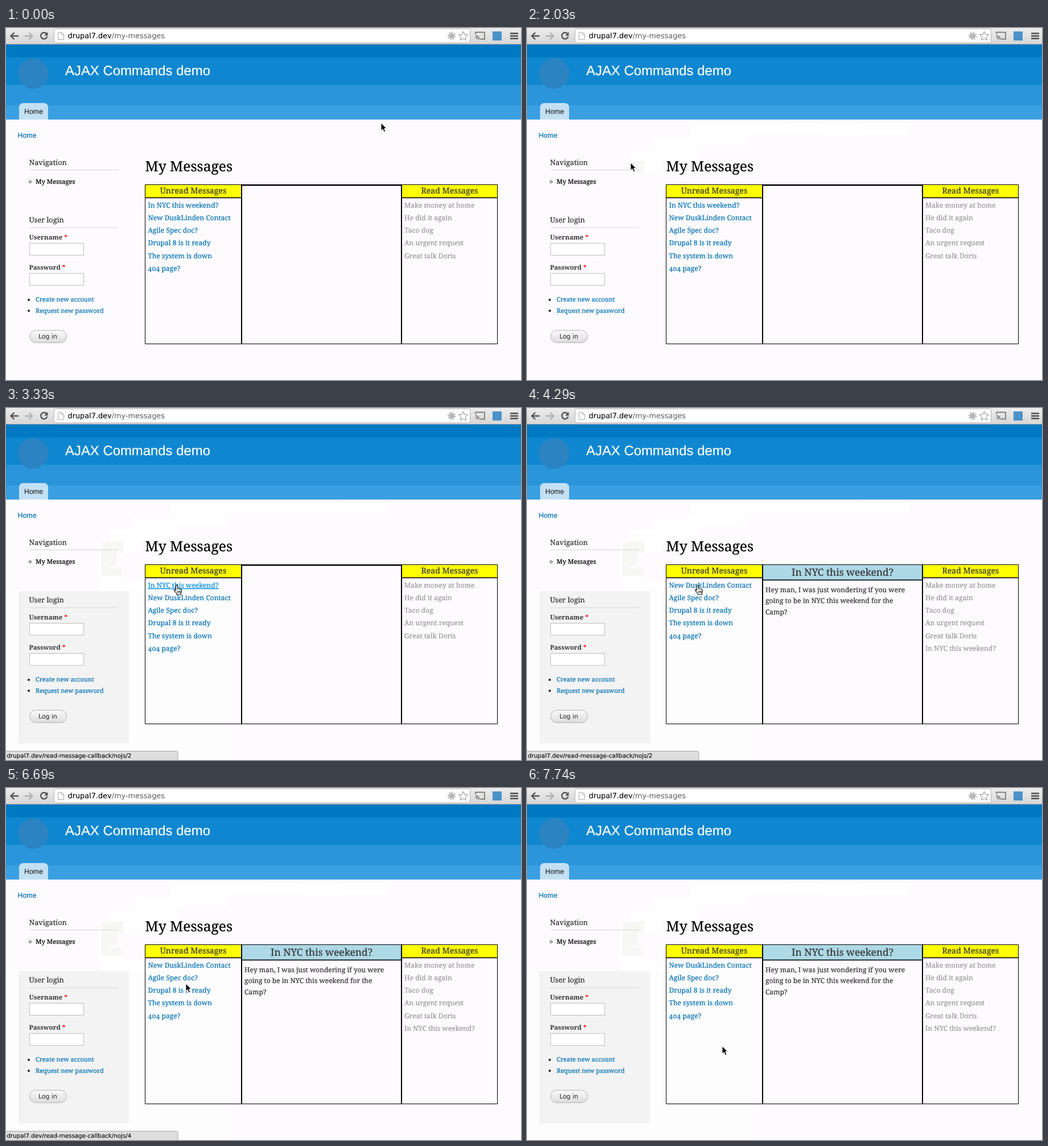
Recreate the animation shown at these times as an HTML page. Size 905x619 px, loop 8000 ms.

```html
<!DOCTYPE html>
<html lang="en">
<head>
<meta charset="utf-8">
<title>AJAX Commands demo</title>
<style>
  html, body { margin: 0; width: 100%; height: 100%; overflow: hidden; background: #fdfbfd; }
  svg { display: block; }
  text { font-family: "Noto Serif", Georgia, serif; font-variant-numeric: oldstyle-nums;
    text-rendering: geometricPrecision; white-space: pre;
    color: #333; fill: currentColor; stroke: currentColor; stroke-width: .22px; }
  .sans { font-family: "Liberation Sans", Arial, sans-serif; }
  .ui { font-family: "DejaVu Sans", "Lucida Grande", sans-serif; font-variant-numeric: normal; stroke-width: .1px; }
  .black { color: #000; }
  .white { color: #fff; }
  .dim { color: #666; }
  .link { color: #0071b3; }
  .hover { color: #018fe2; text-decoration: underline; }
  .read { color: #999; }
  .mid { text-anchor: middle; }
  .bold { font-weight: bold; stroke: none; }
  .bold tspan { fill: #f00; }
</style>
</head>
<body>
<svg width="905" height="619" viewBox="0 0 905 619">
  <defs>
    <linearGradient id="bar" x2="0" y2="1"><stop stop-color="#ececec"/><stop offset="1" stop-color="#d6d6d6"/></linearGradient>
    <linearGradient id="btn" x2="0" y2="1"><stop stop-color="#fafafa"/><stop offset="1" stop-color="#dcdcdc"/></linearGradient>
    <clipPath id="trail"></clipPath>
  </defs>
  <g clip-path="url(#trail)">
    <rect y="161" width="905" height="168" fill="#fff"/>
    <rect x="168" y="235" width="38" height="60" fill="#f7f7f3"/>
  </g>
  <g id="repaint">
    <rect y="322" width="398" height="297" fill="#fefdfe"/>
    <rect x="22" y="322" width="194" height="268" fill="#f3f3f3"/>
  </g>
  <g id="page"></g>
  <g id="toolbar">
    <rect width="905" height="29" fill="url(#bar)"/>
    <rect y="28" width="905" height="1" fill="#a3a3a3"/>
    <rect x="84.5" y="1.5" width="731" height="24.5" rx="2" fill="#fff" stroke="#b4b4b4"/>
    <g fill="none" stroke="#555" stroke-width="2.4">
      <path id="back" d="M22 14H9M14.5 8l-6 6l6 6"/>
      <use href="#back" transform="matrix(-1 0 0 1 55 0)" opacity=".35"/>
      <path d="M71.5 10.5A5.6 5.6 0 1 0 72.3 15"/>
    </g>
    <path d="M73.5 7v6.5h-6.5z" fill="#555"/>
    <path d="M91.5 7.5h6l4 4v9h-10zM97.5 7.5v4h4" fill="#fff" stroke="#aaa"/>
    <circle cx="783" cy="14" r="5" fill="#b8b8b8"/>
    <circle cx="783" cy="14" r="6" fill="none" stroke="#b8b8b8" stroke-width="3" stroke-dasharray="2 2.7"/>
    <path d="M803.5 6l2.4 5.3 5.6.6-4.2 3.9 1.2 5.7-5-2.9-5 2.9 1.2-5.7-4.2-3.9 5.6-.6z" fill="#fff" stroke="#858585"/>
    <path d="M825 11V7.500h16v12h-8M825 13.500a6.500 6.500 0 0 1 6.500 6.500M825 16.700a3.300 3.300 0 0 1 3.300 3.300" fill="none" stroke="#666" stroke-width="1.500"/>
    <rect x="855" y="6" width="16" height="16" fill="#4a92c8"/>
    <path d="M886 9.500h14M886 14h14M886 18.500h14" stroke="#4c4c4c" stroke-width="2.600"/>
  </g>
  <g id="status">
    <path d="M-1 603.500H299q3 0 3 3V620H-1z" fill="#dedede" stroke="#a8a8a8"/>
  </g>
  <g id="cursor">
    <path id="arrow" d="M0 0V13.500L3.100 10.700L5.300 15.800L7.700 14.800L5.600 9.800H9.800Z" fill="#000" stroke="#fff"/>
    <path id="hand" d="M-1.500 8.500V1a1.500 1.500 0 0 1 3 0V5.500l4 .8q3 .7 3 3l-1 4V16H0v-2l-4.500-5q-.5-2 1.200-1.600z M2 9.500v3.500M4.200 9.500v3.500M6.200 9.700v3" fill="#fff" stroke="#000" stroke-width="1.100"/>
  </g>
</svg>
<script>
const NS = "http://www.w3.org/2000/svg";
const LOOP = 8000, TICK = 116, OPEN = 4290, LINE = 22.15;
const $ = id => document.getElementById(id);

function add(tag, attrs, parent = $("page")) {
  const el = document.createElementNS(NS, tag);
  for (const k in attrs) el.setAttribute(k, attrs[k]);
  parent.appendChild(el);
  return el;
}
const rect = (x, y, width, height, fill, parent) => add("rect", { x, y, width, height, fill }, parent);
function text(str, x, y, size, cls = "", parent) {
  const el = add("text", { x, y, "font-size": size, class: cls }, parent);
  el.textContent = str;
  return el;
}
const show = (el, on) => { el.style.display = on ? "" : "none"; };

function header() {
  const tops = [29, 52, 100, 136, 161];
  ["#0079c3", "#0f87d0", "#2a95da", "#3a9fe1"]
    .forEach((fill, i) => rect(0, tops[i], 905, tops[i + 1] - tops[i], fill));
  add("circle", { cx: 47.5, cy: 80, r: 27, fill: "#2b83c2" });
  text("AJAX Commands demo", 104, 83, 23.9, "sans white");
  add("path", { d: "M23 161V140q0-8 8-8H66q8 0 8 8V161z", fill: "#c3e0f3" });
  text("Home", 32, 151, 12.4, "sans");
  text("Home", 20.5, 192.5, 12.4, "sans link");
}

function sidebar() {
  const heading = (str, y) => {
    text(str, 40.5, y, 12.7);
    rect(41, y + 8.5, 156, 1, "#d6d6d6");
  };
  heading("Navigation", 240.5);
  add("circle", { cx: 42.5, cy: 270.5, r: 1.9, fill: "none", stroke: "#222" });
  text("My Messages", 52, 274, 11.2, "black");
  heading("User login", 342);
  ["Username", "Password"].forEach((label, i) => {
    const y = 372 + 53 * i;
    const el = text(label, 40.5, y, 11.4, "bold");
    add("tspan", {}, el).textContent = " *";
    add("rect", { x: 41.5, y: y + 6.5, width: 95, height: 21, fill: "#fff", stroke: "#bdbdbd" });
  });
  ["Create new account", "Request new password"].forEach((label, i) => {
    const y = 481.3 + 19.3 * i;
    add("circle", { cx: 40, cy: y - 3.3, r: 2, fill: "#222" });
    text(label, 52, y, 10.95, "link");
  });
  add("rect", { x: 41.5, y: 531.5, width: 65, height: 22, rx: 11, fill: "url(#btn)", stroke: "#b3b3b3" });
  text("Log in", 57, 546.3, 10.9, "ui");
}

// Message columns
const rowY = i => 316 + LINE * i;
const rows = (list, x, cls) => list.map((s, i) => text(s, x, rowY(i), 12.05, cls));
function column(title, x, width, fill, size, height, parent) {
  rect(x, 276, width, height, fill, parent);
  rect(x - 1, 275.7 + height, width + 2, 1.6, "#000", parent);
  text(title, x + width / 2, 270.500 + height * 0.93, size, "mid", parent);
}

header();
sidebar();
text("My Messages", 244.5, 252, 24.7, "black");
column("Unread Messages", 245, 168, "#ff0", 14.1, 22);
column("Read Messages", 696, 167, "#ff0", 14.1, 22);
const emptyHead = rect(414, 276, 281, 1.5, "#000");
const note = add("g", {});
column("In NYC this weekend?", 415, 279, "#add8e6", 17.4, 26, note);
["Hey man, I was just wondering if you were", "going to be in NYC this weekend for the", "Camp?"]
  .forEach((line, i) => text(line, 419, 323.7 + 19.5 * i, 12, "", note));
add("path", { d: "M244.500 275.500H863.500V555.500H244.500Z", fill: "none", stroke: "#000" });
add("path", { d: "M414 275V556M695 275V556", stroke: "#000", "stroke-width": 2 });
const unread = rows(["In NYC this weekend?", "New DuskLinden Contact", "Agile Spec doc?",
  "Drupal 8 is it ready", "The system is down", "404 page?"], 249.5, "link");
const read = rows(["Make money at home", "He did it again", "Taco dog", "An urgent request",
  "Great talk Doris", "In NYC this weekend?"], 700, "read");

text("drupal7.dev", 108.5, 18.3, 12.85, "ui black", $("toolbar"));
text("/my-messages", 185.7, 18.3, 12.85, "ui dim", $("toolbar"));
const statusText = text("", 1.5, 615, 10.3, "ui black", $("status"));

// Each move follows a quadratic curve, sampled once per TICK
const moves = [
  { at: 960, steps: 4, p: [[659, 167], [517, 171], [375, 169]] },
  { at: 1790, steps: 7, p: [[375, 169], [32, 249], [240, 325]] },
  { at: 2620, steps: 7, p: [[240, 325], [324, 337], [300, 312]], hand: true },
  { at: 6690, steps: 7, p: [[300, 312], [361, 430], [343, 454]] }
];
function pointOn({ p: [a, b, c], steps }, k) {
  const u = k / steps, v = 1 - u;
  return [0, 1].map(i => v * v * a[i] + 2 * v * u * b[i] + u * u * c[i]);
}
function pointer(t) {
  const move = moves.filter(m => m.at <= t).pop();
  if (!move) return { pos: moves[0].p[0], hand: false };
  const k = Math.min(move.steps, Math.floor((t - move.at) / TICK) + 1);
  return { pos: pointOn(move, k), hand: !!move.hand };
}

// The arrow leaves repainted background behind it
const trail = moves.slice(0, 2).flatMap(m => Array.from({ length: m.steps }, (_, k) => {
  const [x0, y0] = pointOn(m, k), [x1, y1] = pointOn(m, k + 1);
  const el = rect(Math.min(x0, x1), Math.min(y0, y1),
    Math.abs(x1 - x0) + 12, Math.abs(y1 - y0) + 18, "#fff", $("trail"));
  return { at: m.at + k * TICK, el };
}));

function draw(t) {
  const { pos, hand } = pointer(t);
  const opened = t >= OPEN;
  const row = Math.floor((pos[1] - 301) / LINE);
  const hovered = !hand || (opened && t < OPEN + TICK) ? -1 : row + opened;
  trail.forEach(s => show(s.el, t >= s.at));
  show($("repaint"), t >= 2620);
  show(note, opened);
  show(emptyHead, !opened);
  show(read[5], opened);
  unread.forEach((el, i) => {
    show(el, i >= opened);
    el.setAttribute("y", rowY(i - opened));
    el.setAttribute("class", i === hovered ? "link hover" : "link");
  });
  show($("status"), t >= 2620 && t < 7510);
  $("status").setAttribute("opacity", Math.min(1, Math.max(0.1, (7450 - t) / 230)));
  statusText.textContent = "drupal7.dev/read-message-callback/nojs/" + (row === 0 ? 2 : 4);
  show($("arrow"), !hand);
  show($("hand"), hand);
  $("cursor").setAttribute("transform", `translate(${pos.map(Math.round).join(" ")})`);
}

const start = performance.now();
function tick() {
  draw((performance.now() - start) % LOOP);
  requestAnimationFrame(tick);
}
tick();
</script>
</body>
</html>
```
